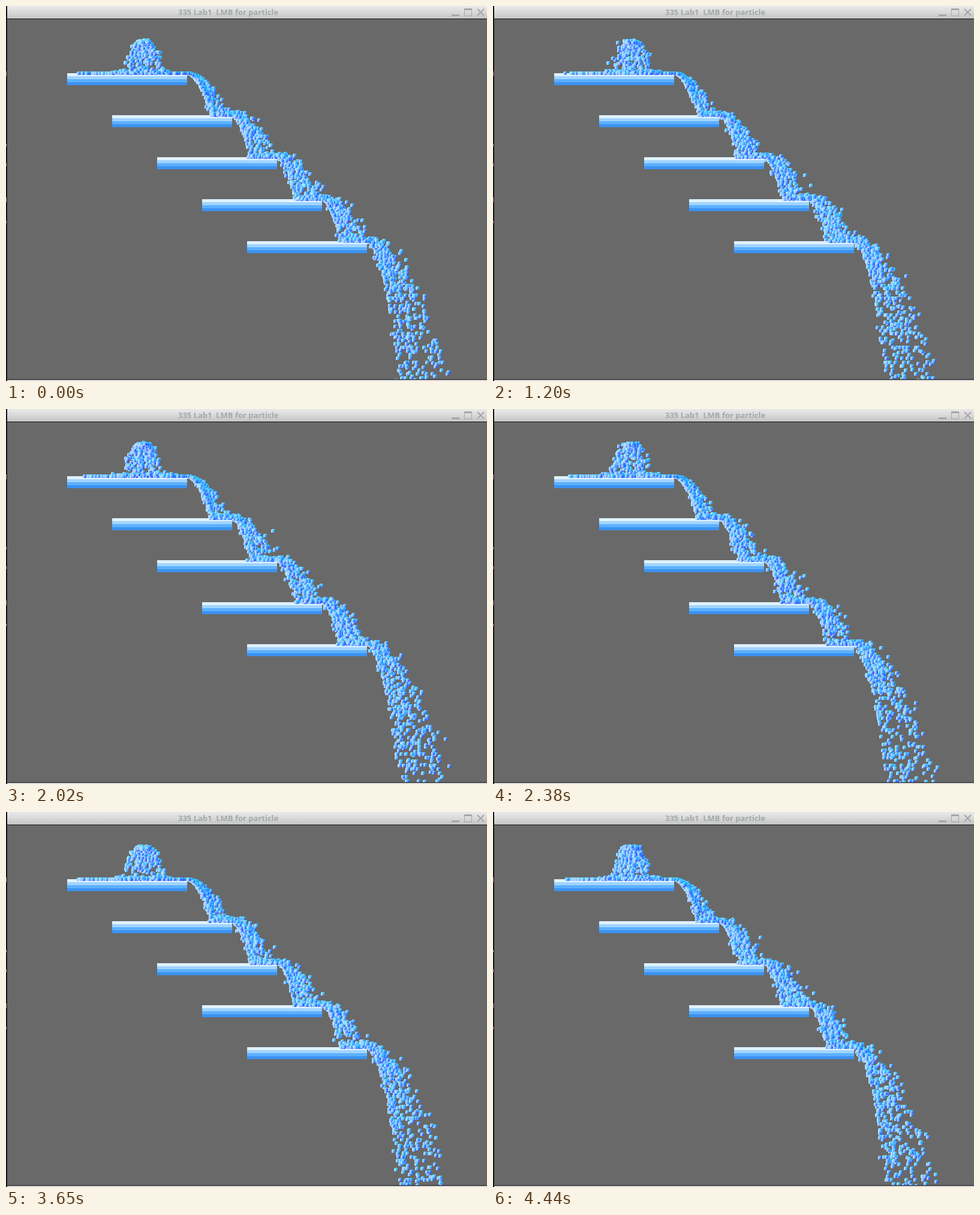
Animation of 802 by 625 pixels, one loop 4.54 s. Source, as an HTML page with a canvas:

```html
<!DOCTYPE html>
<html lang="en">
<head>
<meta charset="utf-8">
<title>Particle waterfall</title>
<style>
  html, body { margin: 0; width: 100%; height: 100%; overflow: hidden; background: #696969; }
  #stage { position: relative; width: 802px; height: 625px; overflow: hidden; background: #696969; }
  canvas { position: absolute; left: 0; top: 0; }
  .bar {
    position: absolute; left: 2px; top: 0; width: 800px; height: 21px;
    background: linear-gradient(#e9e9e9, #d9d9d9 50%, #c3c3c3);
    border-bottom: 1px solid #111;
  }
  .title {
    position: absolute; left: 285px; top: 0; white-space: pre; color: #a2a8aa;
    font: bold 13px/21px "Open Sans", "Noto Sans", sans-serif;
  }
  .bar svg { position: absolute; right: 0; top: 0; }
  .side { position: absolute; left: 0; top: 0; width: 2px; height: 625px; background: #15141f; }
  .side i { position: absolute; left: 0; width: 1px; height: 8px; background: #d08a48; }
  .foot { position: absolute; left: 2px; top: 622px; width: 800px; height: 2px; background: #d2d2d2; border-top: 1px solid #111; }
</style>
</head>
<body>
<div id="stage">
  <canvas id="view" width="802" height="625"></canvas>
  <div class="side">
    <i style="top:109px"></i><i style="top:230px;height:4px;background:#aaa"></i>
    <i style="top:262px;height:5px"></i><i style="top:319px"></i><i style="top:358px;height:4px"></i>
  </div>
  <div class="bar">
    <span class="title">335 Lab1  LMB for particle</span>
    <svg width="62" height="21" fill="none" stroke="#a6a6a6">
      <path d="M3 15.5H16" stroke-width="3"/>
      <path d="M24.5 5V16.5H36.5V5"/>
      <path d="M24 5.5H37" stroke-width="3"/>
      <path d="M46 5L57 16M57 5L46 16" stroke-width="2"/>
    </svg>
  </div>
  <div class="foot"></div>
</div>
<script>
const LOOP = 4540, FRAMES = 103, FRAME_MS = 4440 / 102;
const STEPS = 3, WARM_UP = 900, GRAVITY = 0.1;
const SHADES = 4, SIZE = 6;
const ctx = document.getElementById('view').getContext('2d');

let seed = 335;
function rnd() {
  seed = (seed + 0x6D2B79F5) | 0;
  let t = Math.imul(seed ^ (seed >>> 15), 1 | seed);
  t = (t + Math.imul(t ^ (t >>> 7), 61 | t)) ^ t;
  return ((t ^ (t >>> 14)) >>> 0) / 4294967296;
}
const between = (a, b) => a + (b - a) * rnd();

const shelves = Array.from({ length: 5 }, (_, i) => ({ x: 102 + 75 * i, y: 112 + 70 * i }));

// Simulation
let drops = [];

function emit() {
  const n = Math.floor(between(5, 14));
  for (let i = 0; i < n; i++) {
    drops.push({
      x: 230 + between(-7, 7), y: between(58, 62),
      vx: between(-1, 1), vy: between(-0.6, 0.2),
      push: between(0.008, 0.014), shade: Math.floor(rnd() * SHADES)
    });
  }
}

function collide(d) {
  const i = shelves.findIndex(s => d.x >= s.x && d.x <= s.x + 200 && d.y >= s.y && d.y < s.y + 20);
  if (i < 0) return;
  d.y = shelves[i].y;
  if (d.vy > 1.5) {
    d.vy *= -between(0.08, 0.27);
    if (i > 0) d.vx = 0.8 + 1.25 * rnd() ** 1.2;
  } else {
    d.vy = 0;
  }
  if (i === 0) d.vx += d.push;
}

function step() {
  emit();
  for (const d of drops) {
    d.x += d.vx;
    d.y += d.vy;
    d.vy += GRAVITY;
    collide(d);
  }
  drops = drops.filter(d => d.y < 630);
}

for (let i = 0; i < WARM_UP; i++) step();
const frames = Array.from({ length: FRAMES }, () => {
  const shot = new Int16Array(drops.length * 3);
  drops.forEach((d, i) => shot.set([Math.round(d.x), Math.round(d.y), d.shade], i * 3));
  for (let i = 0; i < STEPS; i++) step();
  return shot;
});

// Drawing
function makeSprite(shade) {
  const c = document.createElement('canvas');
  c.width = c.height = SIZE;
  const g = c.getContext('2d');
  const light = [185, 226, 255];
  const top = [35, 160 + shade * 14, 255];
  const low = [30, 40 + shade * 28, 255];
  for (let y = 0; y < SIZE; y++) {
    for (let x = 0; x < SIZE; x++) {
      const u = x / (SIZE - 1), v = y / (SIZE - 1);
      const rgb = light.map((l, k) => Math.round(l * (1 - u) + u * (top[k] * (1 - v) + low[k] * v)));
      g.fillStyle = `rgb(${rgb})`;
      g.fillRect(x, y, 1, 1);
    }
  }
  g.clearRect(0, 0, 1, 1);
  g.clearRect(SIZE - 1, SIZE - 1, 1, 1);
  return c;
}
const sprites = Array.from({ length: SHADES }, (_, i) => makeSprite(i));
const bands = ['#e0f2fd', '#a0d4fe', '#5cb0ff', '#3c92f0'];

function draw(n) {
  ctx.fillStyle = '#696969';
  ctx.fillRect(0, 0, 802, 625);
  for (const s of shelves) {
    bands.forEach((color, i) => {
      ctx.fillStyle = color;
      ctx.fillRect(s.x, s.y + i * 5, 200, 5);
    });
  }
  const shot = frames[n];
  for (let i = 0; i < shot.length; i += 3) {
    ctx.drawImage(sprites[shot[i + 2]], shot[i] - 3, shot[i + 1] - 3);
  }
}

const start = performance.now();
let shown = -1;
function tick() {
  const t = (performance.now() - start) % LOOP;
  const n = Math.min(FRAMES - 1, Math.floor(t / FRAME_MS));
  if (n !== shown) draw(shown = n);
  requestAnimationFrame(tick);
}
tick();
</script>
</body>
</html>
```
